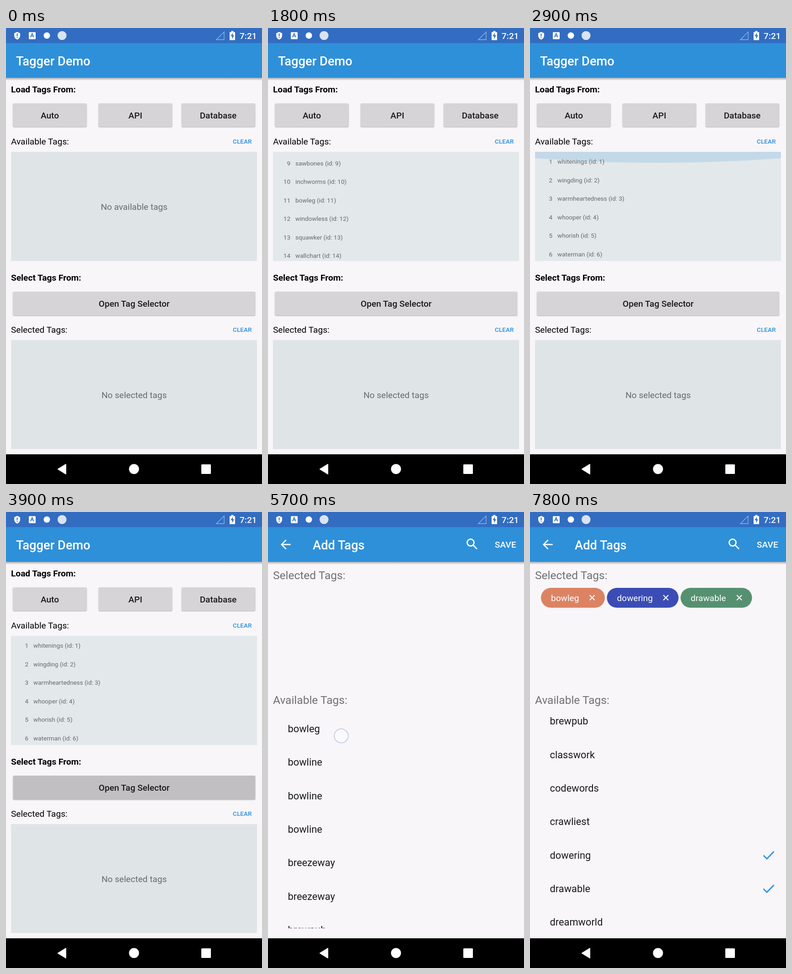
These frames come from a looping animation (561x998 px, 8 s). An HTML page:

```html
<!DOCTYPE html>
<html lang="en">
<head>
<meta charset="utf-8">
<title>Tagger Demo</title>
<style>
html, body { margin: 0; width: 100%; height: 100%; overflow: hidden; background: #000; }
svg { display: block; width: 100%; height: 100%; }
text { font-family: Roboto, sans-serif; font-size: 19.1px; fill: #000; white-space: pre; }
.b { font-weight: 700; }
.m { font-weight: 500; }
.mid { text-anchor: middle; }
.title { font-size: 27.3px; font-weight: 500; fill: #fff; }
.light { fill: #fff; }
.hint { fill: #6a6b6d; text-anchor: middle; }
.clear { font-size: 13.65px; font-weight: 500; fill: #2b8fdd; }
.head { font-size: 24.5px; fill: #717073; }
.btn rect { fill: #d6d4d6; filter: drop-shadow(0 1.3px 1.3px rgba(0,0,0,.32)); }
.btn text { font-weight: 500; text-anchor: middle; fill: #1b1b1b; }
#tags text { font-size: 13.55px; fill: #67696b; }
#tags .n { text-anchor: end; }
#words text { font-size: 21.84px; fill: #1a1a1b; }
.check { fill: none; stroke: #2b8fdd; stroke-width: 2.8; }
.x { stroke: #fff; stroke-width: 2; }

/* One 8 s loop at ten steps a second: 1.25% is 100 ms */
.a { animation: 8s step-end infinite; }
#loaded { animation-name: loaded; }
#tags { animation-name: tags; }
#glow { animation-name: glow; transform-origin: 0 271px; }
#pressAuto { animation-name: pressAuto; }
#pressOpen { animation-name: pressOpen; }
#picker { animation-name: enter; }
#words { animation-name: words; }
#dot { animation-name: dot; }
.s1 { animation-name: s1; }
.s2 { animation-name: s2; }
.s3 { animation-name: s3; }

@keyframes loaded { 0% { opacity: 0 } 10%, 100% { opacity: 1 } }
@keyframes tags {
  0%, 17.5% { transform: translateY(0) }
  18.75% { transform: translateY(-60px) }
  20% { transform: translateY(-160px) }
  21.25% { transform: translateY(-255px) }
  22.5% { transform: translateY(-320.8px) }
  23.75% { transform: translateY(-347px) }
  25% { transform: translateY(-358px) }
  26.25% { transform: translateY(-362px) }
  31.25% { transform: translateY(-310px) }
  32.5% { transform: translateY(-180px) }
  33.75% { transform: translateY(-60px) }
  35%, 100% { transform: translateY(0) }
}
@keyframes glow {
  0% { opacity: 0; transform: scaleY(.6) }
  35% { opacity: .13; transform: scaleY(.7) }
  36.25% { opacity: .165; transform: scaleY(1) }
  37.5% { opacity: .11; transform: scaleY(.8) }
  38.75% { opacity: .05; transform: scaleY(.4) }
  40%, 100% { opacity: 0; transform: scaleY(.4) }
}
@keyframes pressAuto {
  0% { opacity: 0; clip-path: circle(30px at 93px 33px) }
  7.5% { opacity: .1; clip-path: circle(45px at 93px 33px) }
  8.75% { opacity: .1; clip-path: circle(120px at 93px 33px) }
  10% { opacity: .05; clip-path: circle(200px at 93px 33px) }
  11.25%, 100% { opacity: 0 }
}
@keyframes pressOpen {
  0% { opacity: 0; clip-path: circle(30px at 275px 28px) }
  47.5% { opacity: .1; clip-path: circle(90px at 275px 28px) }
  48.75% { opacity: .1; clip-path: circle(300px at 275px 28px) }
  50% { opacity: .05; clip-path: circle(400px at 275px 28px) }
  51.25%, 100% { opacity: 0 }
}
@keyframes enter {
  0% { opacity: 0; transform: translateY(80px) }
  53.75% { opacity: .8; transform: translateY(26.4px) }
  55% { opacity: 1; transform: translateY(2.9px) }
  56.25%, 100% { opacity: 1; transform: none }
}
@keyframes words {
  0% { transform: translateY(0) }
  78.75% { transform: translateY(-127px) }
  80% { transform: translateY(-317px) }
  81.25% { transform: translateY(-460.5px) }
  82.5% { transform: translateY(-458px) }
  83.75%, 100% { transform: translateY(-456.5px) }
}
@keyframes s1 { 0% { opacity: 0 } 73.75%, 100% { opacity: 1 } }
@keyframes s2 { 0% { opacity: 0 } 90%, 100% { opacity: 1 } }
@keyframes s3 { 0% { opacity: 0 } 96.25%, 100% { opacity: 1 } }
@keyframes dot {
  0%, 8.75%, 21.25%, 33.75%, 48.75%, 73.75%, 82.5%, 90%, 96.25%, 100% { opacity: 0; transform: none }
  6.25% { opacity: 1; transform: translate(108px, 198px) }
  17.5% { opacity: 1; transform: translate(290px, 460px) }
  18.75% { opacity: 1; transform: translate(291px, 390px) }
  20% { opacity: 1; transform: translate(293px, 290px) }
  30% { opacity: 1; transform: translate(288px, 310px) }
  31.25% { opacity: 1; transform: translate(287px, 372px) }
  32.5% { opacity: 1; transform: translate(285px, 490px) }
  46.25% { opacity: 1; transform: translate(290px, 605px) }
  71.25% { opacity: 1; transform: translate(160.5px, 490px) }
  77.5% { opacity: 1; transform: translate(268px, 781px) }
  78.75% { opacity: 1; transform: translate(272px, 640px) }
  80% { opacity: 1; transform: translate(278px, 450px) }
  81.25% { opacity: 1; transform: translate(285.8px, 307px) }
  87.5% { opacity: 1; transform: translate(190px, 757px) }
  93.75% { opacity: 1; transform: translate(198px, 831px) }
}
</style>
</head>
<body>
<svg viewBox="0 0 561 998" preserveAspectRatio="none">
  <defs>
    <linearGradient id="shade" x2="0" y2="1">
      <stop stop-color="#000" stop-opacity=".3"/>
      <stop offset="1" stop-color="#000" stop-opacity="0"/>
    </linearGradient>
    <clipPath id="tagBox"><rect x="11" y="271" width="539" height="239"/></clipPath>
    <clipPath id="wordBox"><rect y="432" width="561" height="479"/></clipPath>
    <g id="frame">
      <rect width="561" height="933" fill="#f8f6f9"/>
      <rect y="109" width="561" height="6" fill="url(#shade)"/>
      <rect width="561" height="33.5" fill="#326dc1"/>
      <rect y="33" width="561" height="76" fill="#2e90d9"/>
    </g>
    <path id="tick" class="check" d="M511.500 751.500l7.500 7.500 15.500-16"/>
    <path id="cross" class="x" d="M-5.500-5.500l11 11m0-11l-11 11"/>
  </defs>

  <!-- Main screen -->
  <use href="#frame"/>
  <text class="title" x="22" y="81.500">Tagger Demo</text>
  <text class="b" x="11" y="141">Load Tags From:</text>
  <g class="btn">
    <rect x="15.500" y="165" width="161" height="51" rx="2.500"/>
    <rect x="203" y="165" width="161" height="51" rx="2.500"/>
    <rect x="385" y="165" width="161" height="51" rx="2.500"/>
    <rect x="15.500" y="577" width="530.500" height="52" rx="2.500"/>
    <g transform="translate(15.500 165)"><path id="pressAuto" class="a" d="M0 0h161v51h-161z"/></g>
    <g transform="translate(15.500 577)"><path id="pressOpen" class="a" d="M0 0h530.500v52h-530.500z"/></g>
    <text x="96" y="197.500">Auto</text>
    <text x="283.500" y="197.500">API</text>
    <text x="465" y="197.500">Database</text>
    <text x="280.800" y="609.500">Open Tag Selector</text>
  </g>
  <text x="11" y="255">Available Tags:</text>
  <text class="clear" x="497" y="252.500">CLEAR</text>
  <rect x="11" y="271" width="539" height="239" fill="#dfe4e7"/>
  <text class="hint" x="280.800" y="398">No available tags</text>
  <g clip-path="url(#tagBox)">
    <g id="loaded" class="a">
      <rect x="11" y="271" width="539" height="239" fill="#e3e8eb"/>
      <g id="tags" class="a"></g>
      <path id="glow" class="a" d="M11 271h539v14q-269.500 20-539 0z" fill="#2b8fdd"/>
    </g>
  </g>
  <text class="b" x="11" y="553">Select Tags From:</text>
  <text x="11" y="667">Selected Tags:</text>
  <text class="clear" x="497" y="664.500">CLEAR</text>
  <rect x="11" y="683" width="539" height="238.500" fill="#dfe4e7"/>
  <text class="hint" x="280.800" y="810">No selected tags</text>
  <rect y="933" width="561" height="65"/>

  <!-- Tag picker -->
  <g id="picker" class="a">
    <use href="#frame"/>
    <path transform="translate(22.300 54.800) scale(1.365)" fill="#fff" d="M20 11H7.830l5.590-5.590L12 4l-8 8 8 8 1.410-1.410L7.830 13H20z"/>
    <text class="title" x="98" y="81.500">Add Tags</text>
    <g transform="translate(431 54) scale(1.365)" fill="none" stroke="#fff" stroke-width="2">
      <circle cx="9.500" cy="9.500" r="5.500"/><path d="M13.800 13.800l6 6"/>
    </g>
    <text class="m light" x="497" y="78.300">SAVE</text>
    <text class="head" x="11" y="146.500">Selected Tags:</text>
    <g id="chips"></g>
    <text class="head" x="11" y="419.500">Available Tags:</text>
    <g clip-path="url(#wordBox)">
      <g id="words" class="a"></g>
    </g>
  </g>

  <!-- System bars -->
  <g fill="#fff">
    <path d="M24.500 8.500l6.500 3v5q0 6-6.500 9-6.500-3-6.500-9v-5z"/>
    <path d="M24.500 12v6m0 1.500v2" stroke="#326dc1" stroke-width="2"/>
    <rect x="50" y="9" width="15" height="15.500" rx="1.500"/>
    <path d="M53.700 20.500l3.600-8.500 3.600 8.500m-6-3h4.800" fill="none" stroke="#326dc1" stroke-width="1.700"/>
    <circle cx="89.500" cy="16.500" r="7"/>
    <circle cx="122.800" cy="16.500" r="9.800" fill="#dbe3f1"/>
    <path d="M461 25.500h17v-17z" fill="none" stroke="#fff" stroke-opacity=".5" stroke-width="1.300"/>
    <path d="M490 9h3.500v-2.500h5v2.500h3.500v17.500h-12z"/>
    <path d="M497 10.500l-4.500 7.500h3v6l4.500-8h-3z" fill="#326dc1"/>
    <text class="m light" x="512" y="23.500">7:21</text>
    <path d="M114 965.500l17-10.500v21z" stroke="#fff" stroke-width="2" stroke-linejoin="round"/>
    <circle cx="280.500" cy="965.300" r="11"/>
    <rect x="428" y="955" width="21" height="21" rx="1.500"/>
  </g>

  <circle id="dot" class="a" r="15.300" fill="#fbfcff" fill-opacity=".7" stroke="#c9cce4" stroke-width="2"/>
</svg>
<script>
const $ = id => document.getElementById(id);

function add(parent, tag, attrs, text = '') {
  const el = document.createElementNS('http://www.w3.org/2000/svg', tag);
  for (const key in attrs) el.setAttribute(key, attrs[key]);
  el.textContent = text;
  return parent.appendChild(el);
}

const tags = ('whitenings wingding warmheartedness whooper whorish waterman wellspring whipsawed ' +
  'sawbones inchworms bowleg windowless squawker wallchart waxwing woodbine').split(' ');
tags.forEach((tag, i) => {
  const y = 297.1 + i * 40.54;
  add($('tags'), 'text', { x: 49, y, class: 'n' }, i + 1);
  add($('tags'), 'text', { x: 60, y }, `${tag} (id: ${i + 1})`);
});

const chips = [
  { name: 'bowleg', x: 24, w: 140, fill: '#dc8363' },
  { name: 'dowering', x: 168.5, w: 157, fill: '#3b4db4' },
  { name: 'drawable', x: 330, w: 156.500, fill: '#559171' }
];
const words = ('bowleg bowline bowline bowline breezeway breezeway brewpub classwork ' +
  'codewords crawliest dowering drawable dreamworld').split(' ');
const pitch = 73.33;

words.forEach((word, i) => add($('words'), 'text', { x: 43.5, y: 482 + i * pitch }, word));

chips.forEach(({ name, x, w, fill }, i) => {
  const cls = `a s${i + 1}`;
  const chip = add($('chips'), 'g', { class: cls });
  add(chip, 'rect', { x, y: 166, width: w, height: 43.5, rx: 21.75, fill });
  add(chip, 'text', { x: x + 22, y: 194.8, class: 'light' }, name);
  add(chip, 'use', { href: '#cross', x: x + w - 27.8, y: 187.5 });
  const row = add($('words'), 'g', { class: cls });
  add(row, 'use', { href: '#tick', y: (words.indexOf(name) - 10) * pitch + 456.5 });
});
</script>
</body>
</html>
```
